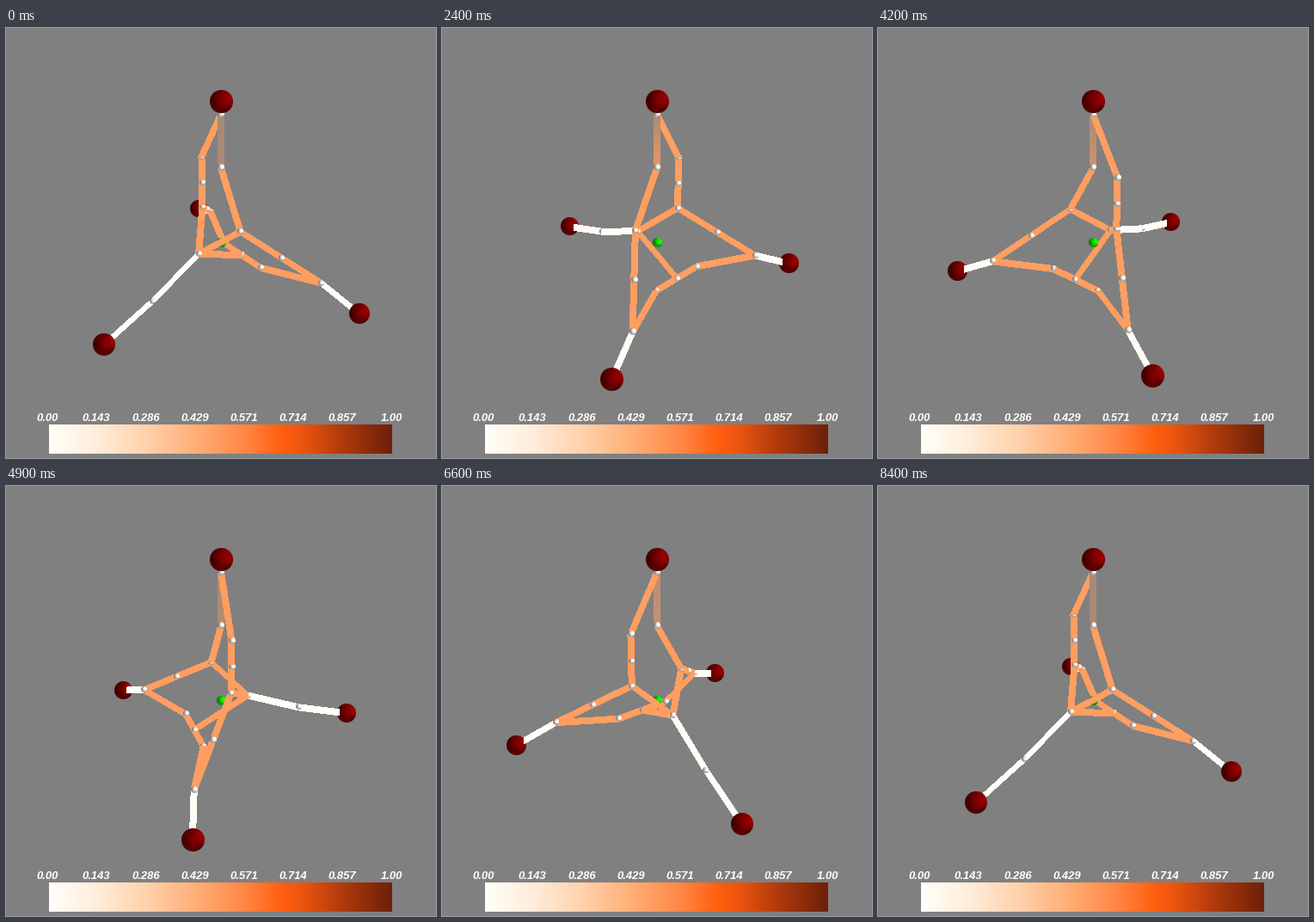
A matplotlib script that plays this animation: 500 px wide and 500 px high, repeating every 8.5 s.

```python
import numpy as np
import matplotlib.pyplot as plt
from matplotlib.animation import FuncAnimation
from matplotlib.colors import LinearSegmentedColormap
from matplotlib.patches import Polygon

SIZE, DPI = 500, 100
FRAMES, HOLD, TURN_STEPS = 85, 5, 79
START = np.radians(-49.6)
TILT = np.arcsin(1 / np.sqrt(3))
DIST = 250 / np.tan(np.radians(15))
CELL = 33.4
PIECES = 8
LINE = 7
BALL_R, HUB_R, PORT_R = 3.3, 5.2, 11.8

GREY = np.full(3, 128 / 255)
ORANGE = np.array([255, 158, 96]) / 255
PALE = np.array([255, 253, 246]) / 255

# Lattice sites of the graph
SITES = {
    "top": (0, 0, 4.93), "a": (0, 0, 3), "c": (0, 1, 1), "d": (1, 0, 0),
    "e": (3, 0, -1), "g": (-1, 0, -1),
    "b1": (0, -1, 3), "b2": (0, -1, 2), "b3": (0, -1, 1),
    "p": (-1, 2, 0), "q": (-2, 3, -1), "h1": (-1, 1, -1),
    "u": (-1, -2, 0), "r": (-2, -3, -1), "h2": (-1, -1, -1),
}
pos = {k: CELL * np.array(v, float) for k, v in SITES.items()}

# Ports sit on the corners of a regular tetrahedron
PORT_DIST = 178.7
ports = {"t": np.array([0, 0, PORT_DIST])}
for name, deg in (("s1", 0), ("s2", 120), ("s3", 240)):
    a = np.radians(deg)
    ports[name] = PORT_DIST * np.array(
        [np.sqrt(8) / 3 * np.cos(a), np.sqrt(8) / 3 * np.sin(a), -1 / 3])

CHAINS = ["top b1 b2 b3 d c a", "c p q h1 g h2 r u b3", "d g"]
LINKS = [("d", "e"), ("e", "s1"), ("q", "s2"), ("r", "s3")]


def project(p, turn):
    """Return screen x, screen y, nearness and scale of a point."""
    phi = np.arctan2(p[1], p[0]) + turn
    rho = np.hypot(p[0], p[1])
    side, front = rho * np.sin(phi), rho * np.cos(phi)
    up = p[2] * np.cos(TILT) - front * np.sin(TILT)
    near = p[2] * np.sin(TILT) + front * np.cos(TILT)
    s = DIST / (DIST - near)
    return 250 + side * s, 250 - up * s, near, s


def ball_sprite(color, n=48):
    """Shaded ball lit by one key light and two fill lights."""
    v = (np.arange(n) + 0.5) / n * 2 - 1
    x, y = np.meshgrid(v, -v)
    d = np.hypot(x, y)
    k = np.maximum(d, 1)
    normal = np.dstack([x / k, y / k, np.sqrt(np.clip(1 - d ** 2, 0, 1))])
    light = np.zeros((n, n))
    for elev, azim, power in ((45, 45, 1), (-30, -60, 0.6), (-30, 60, 0.5)):
        e, a = np.radians([elev, azim])
        ray = np.array([np.cos(e) * np.sin(a), np.sin(e), np.cos(e) * np.cos(a)])
        light += power * np.clip(normal @ ray, 0, None)
    img = np.ones((n, n, 4))
    img[..., :3] = np.clip(light[..., None] * np.array(color), 0, 1)
    img[..., 3] = np.clip((1 - d) * n / 2 + 0.5, 0, 1)
    return img


fig = plt.figure(figsize=(SIZE / DPI, SIZE / DPI), dpi=DPI, facecolor=GREY)
ax = fig.add_axes([0, 0, 1, 1])

# Colour bar
stops = [(0, "#fffff8"), (0.14, "#ffecda"), (0.28, "#ffd2ac"), (0.43, "#ffae76"),
         (0.57, "#ff8746"), (0.68, "#ff5f0f"), (0.74, "#eb550f"),
         (0.857, "#af3a0c"), (1, "#6e2109")]
heat = LinearSegmentedColormap.from_list("heat", stops)
ax.imshow(np.linspace(0, 1, 256)[None], cmap=heat, aspect="auto",
          extent=(50, 449, 495, 461), zorder=-999)
for i, label in enumerate("0.00 0.143 0.286 0.429 0.571 0.714 0.857 1.00".split()):
    ax.text(48 + i * 57.15, 457, label, color="white", ha="center", va="baseline",
            family="Liberation Sans", weight="bold", style="italic",
            size=13 * 72 / DPI)

# Bars are cut into short pieces so that they sort by depth
bars = []


def add_bar(p, q, color, is_axis=False):
    for j in range(PIECES):
        t0, t1 = j / PIECES, min(1, (j + 1.2) / PIECES)
        patch = ax.add_patch(Polygon(np.zeros((4, 2)), fc=color, lw=0,
                                     antialiased=False, snap=False))
        bars.append((patch, p + (q - p) * t0, p + (q - p) * t1,
                     (j + 0.5) / PIECES if is_axis else None))


for chain in CHAINS:
    names = chain.split()
    for m, n in zip(names, names[1:]):
        add_bar(pos[m], pos[n], ORANGE)
add_bar(pos["top"], pos["a"], ORANGE, is_axis=True)
for m, n in LINKS:
    p, q = pos[m], pos.get(n, ports.get(n))
    if n in ports:
        q = q + (p - q) * (PORT_R - 1) / np.linalg.norm(p - q)
    add_bar(p, q, PALE)

balls = []


def add_balls(points, radius, color, lift):
    sprite = ball_sprite(color)
    for p in points:
        img = ax.imshow(sprite, aspect="auto", extent=(0, 1, 1, 0))
        balls.append((img, p, radius, lift))


add_balls(pos.values(), BALL_R, (0.96, 0.96, 0.96), BALL_R)
add_balls([np.zeros(3)], HUB_R, (0.08, 0.9, 0), 3)
add_balls(ports.values(), PORT_R, (0.5, 0, 0), 0)

ax.set_xlim(0, SIZE)
ax.set_ylim(SIZE, 0)
ax.axis("off")

# Strength of the bar on the axis, at its two ends, by turn in degrees
TURNS = [0, 50, 87, 137, 200, 278, 360]
UPPER = [0.3, 0.9, 0.35, 0.4, 0.35, 0.5, 0.3]
LOWER = [0.35, 0.95, 0.85, 0.8, 0.4, 0.55, 0.35]


def draw(i):
    deg = 360 * max(0, i - HOLD) / TURN_STEPS
    turn = START - np.radians(deg)
    hi, lo = np.interp(deg, TURNS, UPPER), np.interp(deg, TURNS, LOWER)
    for patch, p, q, along in bars:
        x0, y0, n0, _ = project(p, turn)
        x1, y1, n1, _ = project(q, turn)
        flat = abs(x1 - x0) > abs(y1 - y0)
        ox, oy = (0, LINE / 2) if flat else (LINE / 2, 0)
        patch.set_xy([(x0 - ox, y0 - oy), (x1 - ox, y1 - oy),
                      (x1 + ox, y1 + oy), (x0 + ox, y0 + oy)])
        patch.set_zorder((n0 + n1) / 2)
        if along is not None:
            mix = hi + (lo - hi) * along
            patch.set_facecolor(GREY + (ORANGE - GREY) * mix)
    for img, p, radius, lift in balls:
        x, y, near, s = project(p, turn)
        r = radius * s
        img.set_extent((x - r, x + r, y + r, y - r))
        img.set_zorder(near + lift)
    return []


anim = FuncAnimation(fig, draw, frames=FRAMES, interval=100,
                     repeat=True, repeat_delay=0, blit=False)
plt.show()
```
